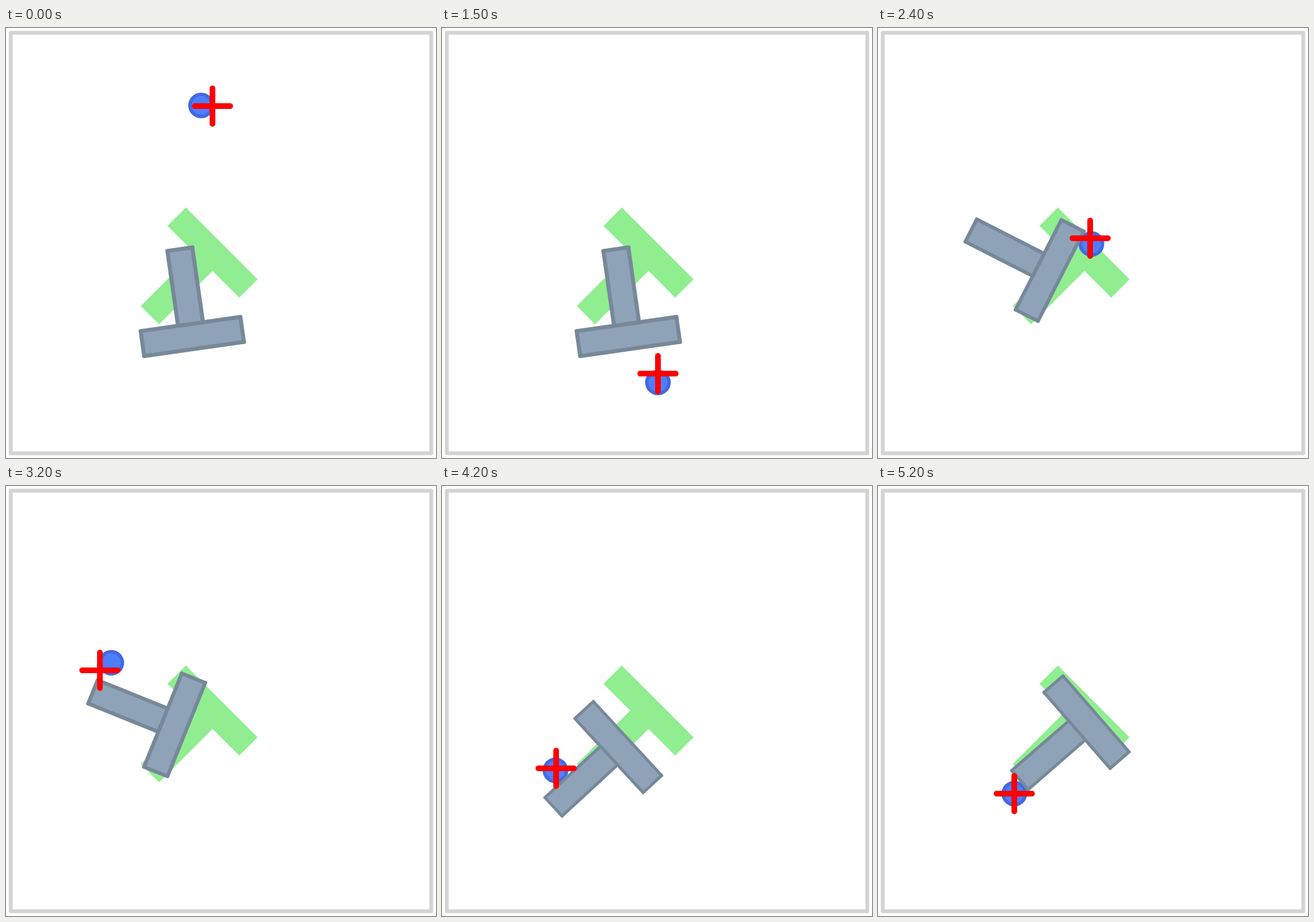
An HTML page with a canvas for the animation above (5300 ms loop, 680 px wide and 680 px high).

```html
<!DOCTYPE html>
<html lang="en">
<head>
<meta charset="utf-8">
<title>Push the T</title>
<style>
  html, body { margin: 0; width: 100%; height: 100%; overflow: hidden; background: #fff; }
  canvas { display: block; }
</style>
</head>
<body>
<canvas id="stage" width="680" height="680"></canvas>
<script>
const ctx = document.getElementById('stage').getContext('2d');
const STEP = 100, STEPS = 53;
const UNIT = 680 / 512;
const BALL = 15.3 * UNIT;
const CENTROID = 54; // distance from the outer bar edge to the T's centre of mass

const pose = (x, y, degrees) => ({ x, y, angle: degrees * Math.PI / 180 });
const mix = (a, b, p) => a + (b - a) * p;

// Each push: the ball approaches through [step, x, y] points, then stays in
// contact, sliding between two grips [across, along] given relative to the T.
const start = pose(289.8, 454.1, 171.9);
const pushes = [
  {
    approach: [[0, 308, 122], [2, 377, 127], [5, 446, 211], [7, 466, 323], [9, 483, 442],
      [10.5, 470, 528], [12, 402, 586], [13.5, 351, 591], [15, 341, 560]],
    from: 16.3, to: 24, grips: [[-42, -74], [-67.6, -73.2]],
    end: pose(241.1, 368, 117), ease: u => 1 - (1 - u) ** 1.35
  },
  {
    approach: [],
    from: 24, to: 25, grips: [[-67.6, -73.2], [-75, -74]],
    end: pose(235.1, 365, 112), ease: u => u
  },
  {
    approach: [[27.5, 343, 224], [29, 306, 184], [30, 262, 205], [32, 166, 279], [32.5, 148, 291]],
    from: 33, to: 42, grips: [[-41, 108], [-41, 64]],
    end: pose(253.7, 435.9, 47.3), ease: u => u ** 1.3
  },
  {
    approach: [[42.5, 180, 446], [44, 142, 476], [45, 140, 503]],
    from: 46, to: 52, grips: [[2, 126], [9.6, 126.3]],
    end: pose(304.1, 395.8, 49), ease: u => u
  }
];
pushes.forEach((push, i) => { push.begin = i ? pushes[i - 1].end : start; });

// Swing from pose a to pose b about the one point that carries a onto b
function swing(a, b, p) {
  const turn = b.angle - a.angle, k = 0.5 / Math.tan(turn / 2);
  const px = (a.x + b.x) / 2 - (b.y - a.y) * k;
  const py = (a.y + b.y) / 2 + (b.x - a.x) * k;
  const c = Math.cos(turn * p), s = Math.sin(turn * p);
  const dx = a.x - px, dy = a.y - py;
  return { x: px + dx * c - dy * s, y: py + dx * s + dy * c, angle: a.angle + turn * p };
}

function progress(push, t) {
  const u = (t - push.from) / (push.to - push.from);
  return push.ease(Math.min(1, Math.max(0, u)));
}

function pushAt(t) {
  return pushes.find(push => t < push.to) || pushes[pushes.length - 1];
}

function blockAt(t) {
  const push = pushAt(t);
  return swing(push.begin, push.end, progress(push, t));
}

function contact(push, t) {
  const p = progress(push, t), block = swing(push.begin, push.end, p);
  const [across, along] = push.grips[0].map((g, i) => mix(g, push.grips[1][i], p));
  const c = Math.cos(block.angle), s = Math.sin(block.angle);
  return [block.x + across * c - along * s, block.y + across * s + along * c];
}

function ballAt(t) {
  const push = pushAt(t), before = pushes[pushes.indexOf(push) - 1];
  if (t >= push.from) return contact(push, t);
  const path = [...push.approach, [push.from, ...contact(push, push.from)]];
  if (before) path.unshift([before.to, ...contact(before, before.to)]);
  return spline(path, t);
}

function slope(keys, i, c) {
  return (keys[i + 1][c] - keys[i][c]) / (keys[i + 1][0] - keys[i][0]);
}

// Tangent limited so that the curve never overshoots its keys
function tangent(keys, i, c) {
  if (i === 0) return slope(keys, 0, c);
  if (i === keys.length - 1) return slope(keys, i - 1, c);
  const a = slope(keys, i - 1, c), b = slope(keys, i, c);
  return a * b > 0 ? 2 * a * b / (a + b) : 0;
}

function spline(keys, t) {
  let i = 0;
  while (i < keys.length - 2 && t >= keys[i + 1][0]) i++;
  const a = keys[i], b = keys[i + 1], span = b[0] - a[0];
  const u = (t - a[0]) / span, v = 1 - u;
  return [1, 2].map(c =>
    v * v * (1 + 2 * u) * a[c] + u * u * (3 - 2 * u) * b[c]
      + span * u * v * (v * tangent(keys, i, c) - u * tangent(keys, i + 1, c)));
}

function line(x1, y1, x2, y2, color, width) {
  ctx.strokeStyle = color;
  ctx.lineWidth = width;
  ctx.lineCap = 'round';
  ctx.beginPath();
  ctx.moveTo(x1, y1);
  ctx.lineTo(x2, y2);
  ctx.stroke();
}

function disc(x, y, r, color) {
  ctx.fillStyle = color;
  ctx.beginPath();
  ctx.arc(x, y, r, 0, 2 * Math.PI);
  ctx.fill();
}

function polygon(points, fill, edge, width) {
  ctx.fillStyle = fill;
  ctx.beginPath();
  points.forEach(p => ctx.lineTo(...p));
  ctx.closePath();
  ctx.fill();
  points.forEach((a, i) => {
    const b = points[(i + 1) % points.length];
    const dx = Math.abs(b[0] - a[0]), dy = Math.abs(b[1] - a[1]);
    // slanted edges come out thinner than upright ones
    line(...a, ...b, edge, width * Math.max(dx, dy) / Math.hypot(dx, dy));
  });
}

// (x, y) is the middle of the bar's outer edge
function drawT(x, y, angle, fill, edge, width) {
  const c = Math.cos(angle) * UNIT, s = Math.sin(angle) * UNIT;
  const rect = (half, top, bottom) =>
    [[-half, top], [half, top], [half, bottom], [-half, bottom]]
      .map(([u, v]) => [x + u * c - v * s, y + u * s + v * c]);
  polygon(rect(60, 0, 30), fill, edge, width);
  polygon(rect(15, 30, 120), fill, edge, width);
}

function drawCross(x, y) {
  line(x - 28, y, x + 28, y, '#f00', 9);
  line(x, y - 28, x, y + 28, '#f00', 9);
}

function draw(step) {
  ctx.fillStyle = '#fff';
  ctx.fillRect(0, 0, 680, 680);
  drawT(340.7, 341, Math.PI / 4, '#90ee90', '#90ee90', 1.5);

  ctx.strokeStyle = '#d3d3d3';
  ctx.lineWidth = 6;
  ctx.lineJoin = 'round';
  ctx.strokeRect(7.5, 7.5, 665, 665);

  const [bx, by] = ballAt(step);
  disc(bx + 0.5, by + 0.5, BALL, '#4169e1');
  disc(bx + 0.5, by + 0.5, BALL - 4 * UNIT, '#4e7eff');

  const { x, y, angle } = blockAt(step);
  drawT(x + CENTROID * Math.sin(angle), y - CENTROID * Math.cos(angle),
    angle, '#8fa3b8', '#778899', 4.8 * UNIT);

  // the marker leads the ball by half a step
  const [mx, my] = ballAt(step + 0.5);
  drawCross(Math.round(mx) + 0.5, Math.round(my) + 0.5);
}

const begin = performance.now();
function tick() {
  const elapsed = performance.now() - begin;
  draw(Math.floor(elapsed / STEP) % STEPS);
  requestAnimationFrame(tick);
}
tick();
</script>
</body>
</html>
```
